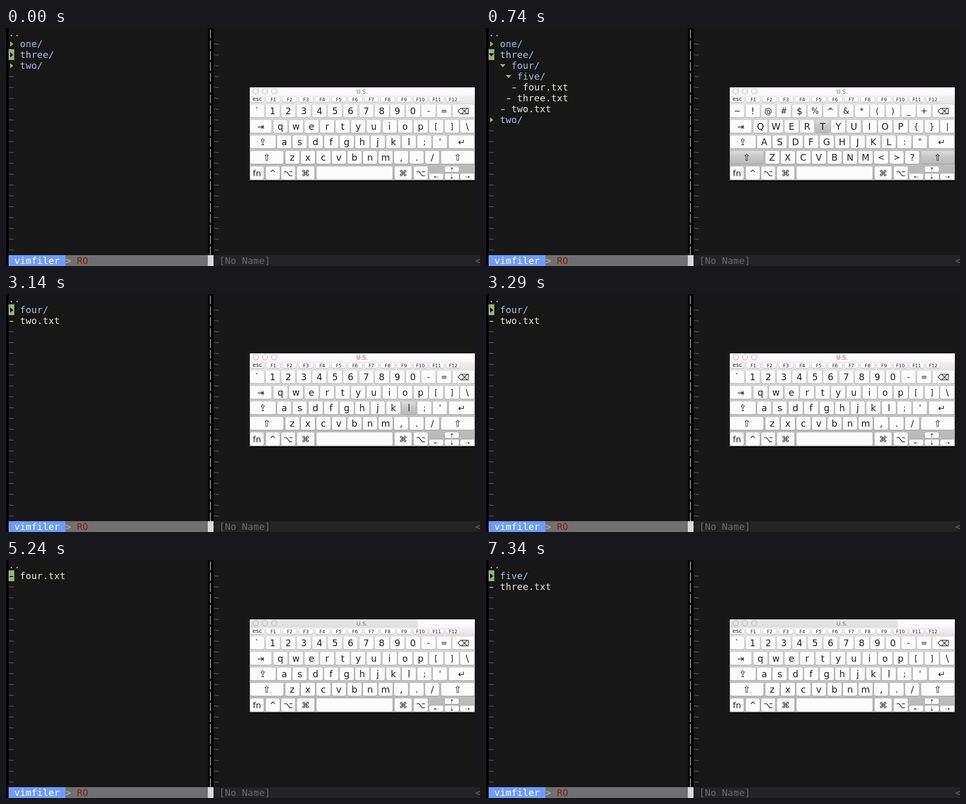
Recreate the animation shown at these times as an HTML page with a canvas. Size 916 by 461 pixels, loop 8000 ms.

```html
<!DOCTYPE html>
<html lang="en">
<head>
<meta charset="utf-8">
<title>File tree and keyboard</title>
<style>
html, body { margin: 0; width: 100%; height: 100%; overflow: hidden; background: #171717; }
canvas { display: block; width: 916px; height: 461px; }
</style>
</head>
<body>
<canvas id="stage" width="916" height="461"></canvas>
<script>
const ctx = document.getElementById('stage').getContext('2d');
const MONO = '"DejaVu Sans Mono", monospace';
const SANS = '"DejaVu Sans", sans-serif';
const LOOP = 8000, CELL = 11, ROW = 21, LEFT = 5, PITCH = 30.1;
const BG = '#171717', DIR = '#9cc5e6', FILE = '#e8e8da', GREEN = '#95b76c', DIM = '#555';

// One entry per line: indent, marker, name.
const closed = [[0, '>', 'one/'], [0, '>', 'three/'], [0, '>', 'two/']];
const open = [
  [0, '>', 'one/'], [0, 'v', 'three/'], [2, 'v', 'four/'], [3, 'v', 'five/'],
  [4, '-', 'four.txt'], [3, '-', 'three.txt'], [2, '-', 'two.txt'], [0, '>', 'two/']
];
const inThree = [[0, '>', 'four/'], [0, '-', 'two.txt']];
const inFour = [[0, '>', 'five/'], [0, '-', 'three.txt']];
const inFive = [[0, '-', 'four.txt']];

// Start time, listing, cursor line, pressed key, shift held.
const steps = [
  [0, closed, 2, '', false],
  [300, closed, 2, '', true],
  [740, open, 2, 't', true],
  [890, open, 2, '', false],
  [3140, inThree, 1, 'l', false],
  [3290, inThree, 1, '', false],
  [4040, inFour, 1, 'l', false],
  [4190, inFour, 1, '', false],
  [5090, inFive, 1, 'l', false],
  [5240, inFive, 1, '', false],
  [7190, inFive, 1, 'h', false],
  [7340, inFour, 1, '', false]
];

// Plain and shifted legends, first key centre, top edge.
const keyRows = [
  ['`1234567890-=', '~!@#$%^&*()_+', 485.3, 148],
  ['qwertyuiop[]\\', 'QWERTYUIOP{}|', 530.3, 178],
  ["asdfghjkl;'", 'ASDFGHJKL:"', 537.8, 208],
  ['zxcvbnm,./', 'ZXCVBNM<>?', 553, 238]
];
// Label, left, top, width, height, text size.
const wideKeys = [
  ['⌫', 863, 148, 42, 25, 16], ['⇥', 472, 178, 41, 25, 16],
  ['⇪', 472, 208, 49, 25, 18], ['↵', 856, 208, 49, 25, 17],
  ['⇧', 472, 238, 64, 25, 18], ['⇧', 841, 238, 64, 25, 18],
  ['fn', 472, 268, 26, 25.5, 16], ['^', 502, 268, 27, 25.5, 15],
  ['⌥', 532, 268, 27, 25.5, 16], ['⌘', 562, 268, 34, 25.5, 16],
  ['', 600, 268, 147, 25.5, 16], ['⌘', 751, 268, 33, 25.5, 16],
  ['⌥', 788, 268, 27, 25.5, 16], ['⇠', 818, 282, 27, 11.5, 11],
  ['⇡', 848, 268, 27, 11, 11], ['⇣', 848, 282, 27, 11.5, 11],
  ['⇢', 878, 282, 27, 11.5, 11]
];

function rect(x, y, w, h, fill) {
  ctx.fillStyle = fill;
  ctx.fillRect(x, y, w, h);
}

function shade(y, h, ...colors) {
  const g = ctx.createLinearGradient(0, y, 0, y + h);
  colors.forEach((c, i) => g.addColorStop(i / (colors.length - 1), c));
  return g;
}

function label(s, x, y, size, color) {
  ctx.font = size + 'px ' + SANS;
  ctx.textAlign = 'center';
  ctx.fillStyle = color;
  ctx.fillText(s, x, y);
}

function term(s, col, row, color) {
  ctx.font = '18px ' + MONO;
  ctx.textAlign = 'left';
  ctx.fillStyle = color;
  [...s].forEach((c, i) => ctx.fillText(c, LEFT + (col + i) * CELL, row * ROW + 16));
}

function marker(kind, col, row, color) {
  const x = LEFT + col * CELL, y = row * ROW - 1;
  if (kind === '-') return rect(x + 2, y + 11, 7, 2, color);
  const pts = kind === '>' ? [[3, 6], [9, 11], [3, 16]] : [[0, 8], [11, 8], [5.5, 14]];
  ctx.fillStyle = color;
  ctx.beginPath();
  pts.forEach(([dx, dy]) => ctx.lineTo(x + dx, y + dy));
  ctx.fill();
}

function drawEditor(list, cursor) {
  rect(0, 0, 916, 461, BG);
  rect(0, 0, 5, 461, '#000');
  rect(390, 0, 11, 440, '#000');
  term('..', 0, 0, DIR);
  rect(LEFT, cursor * ROW - 1, CELL, ROW, GREEN);
  list.forEach(([indent, kind, name], i) => {
    const row = i + 1;
    marker(kind, indent, row, row === cursor ? '#111' : GREEN);
    term(name, indent + 2, row, kind === '-' ? FILE : DIR);
  });
  for (let r = 0; r < 21; r++) {
    rect(394, r * ROW + 3, 2, 17, '#858585');
    if (r > list.length) term('~', 0, r, DIM);
    if (r) term('~', 36, r, DIM);
  }
  rect(5, 440, 110, 21, '#6f9dff');
  rect(115, 440, 275, 21, '#707070');
  rect(390, 440, 11, 21, '#dadada');
  rect(401, 440, 515, 21, '#242424');
  term('vimfiler', 1, 21, '#fff');
  term('>', 10, 21, '#c4b89c');
  term('RO', 12, 21, '#8c1c0c');
  term('[No Name]', 37, 21, '#696969');
  term('<', 82, 21, '#696969');
}

function key(x, y, w, h, down, r = 3) {
  ctx.fillStyle = 'rgba(90,90,90,.35)';
  ctx.beginPath();
  ctx.roundRect(x - .5, y - .3, w + 1, h + 1.3, r + .5);
  ctx.fill();
  ctx.fillStyle = down ? shade(y, h, '#dedede', '#c5c5c5', '#bbb') : '#fcfcfc';
  ctx.beginPath();
  ctx.roundRect(x, y, w, h, r);
  ctx.fill();
}

function drawKeyboard(pressed, shift, dimTitle) {
  rect(471, 294, 435, 4, '#000');
  rect(471, 115, 435, 180, shade(115, 180, '#fff', '#e0e0e0', '#d0d0d0', '#c6c6c6', '#bdbdbd', '#b7b7b7'));
  rect(471, 115, 435, 16, shade(115, 16, '#fff', '#fbf5fb'));
  if (dimTitle) rect(471, 115, 325, 16, shade(115, 16, '#e9e8e9', '#dedede'));
  ctx.strokeStyle = '#a3a3a8';
  ctx.lineWidth = 1;
  for (let i = 0; i < 3; i++) {
    ctx.beginPath();
    ctx.arc(482.5 + 18 * i, 122.5, 5.3, 0, 7);
    ctx.stroke();
  }
  label('U.S.', 688, 127, 11, '#777');

  for (let i = 0; i < 13; i++) {
    const x = i ? 503 + (i - 1) * 31.6 : 472;
    key(x, 132.5, 27, 11, false, 4);
    label(i ? 'F' + i : 'esc', x + 13.5, i ? 142 : 141, i ? 9 : 11, '#222');
  }
  for (const [plain, upper, start, y] of keyRows) {
    [...plain].forEach((c, i) => {
      const x = start + i * PITCH, s = shift ? upper[i] : c;
      key(Math.round(x - 13.5), y, 27, 25, c === pressed);
      const small = '~@#%^&*()_+{}|:"<>[];\'`-='.includes(s);
      label(s, x, y + (small ? 18 : 19), small ? 15 : 17.5, '#222');
    });
  }
  for (const [s, x, y, w, h, size] of wideKeys) {
    key(x, y, w, h, s === '⇧' && shift);
    label(s, x + w / 2, y + h / 2 + size * .38, size, '#222');
  }
}

function draw(now) {
  const t = now % LOOP;
  const [, list, cursor, pressed, shift] = steps.filter(s => s[0] <= t).pop();
  drawEditor(list, cursor);
  drawKeyboard(pressed, shift, t >= 4040);
}

function tick() {
  draw(performance.now());
  requestAnimationFrame(tick);
}
tick();
</script>
</body>
</html>
```
